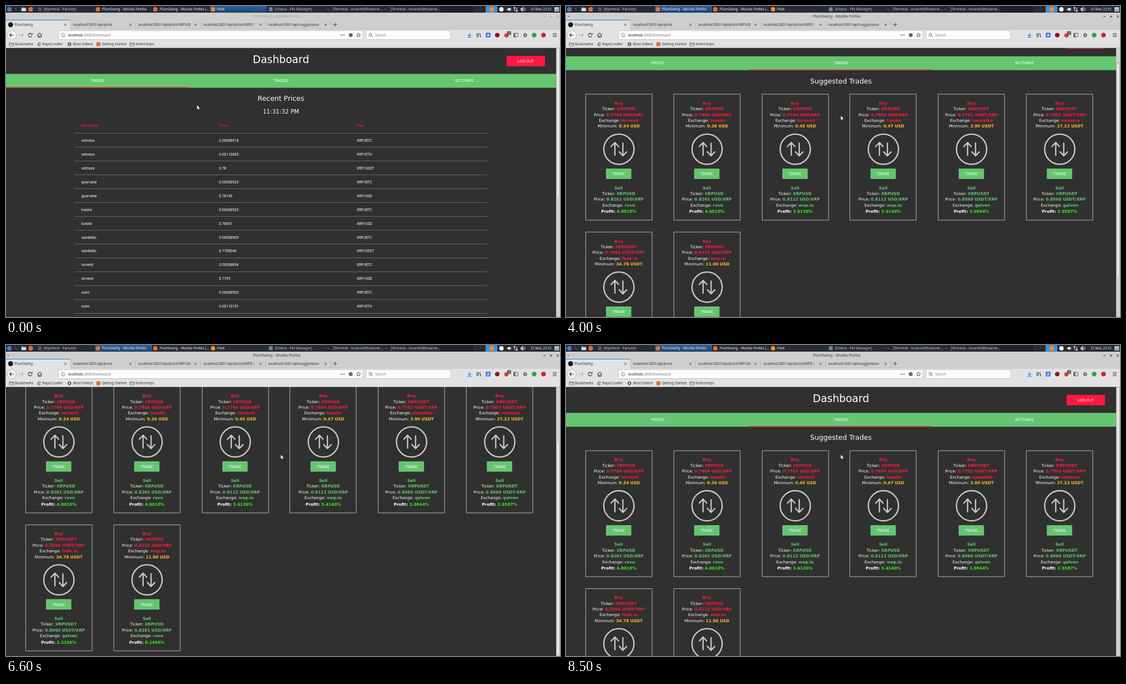
These frames come from a looping animation (998 px wide and 561 px high, 10000 ms). An HTML page with a canvas:

```html
<!DOCTYPE html>
<html lang="en">
<head>
<meta charset="utf-8">
<title>Dashboard</title>
<style>
  html, body { margin: 0; width: 100%; height: 100%; overflow: hidden; background: #303030; }
  canvas { display: block; }
</style>
</head>
<body>
<canvas id="stage" width="998" height="561"></canvas>
<script>
const ctx = document.getElementById('stage').getContext('2d');
const LOOP = 10000, STEP = 100, TOP = 75.5, PAGE_W = 991, MID = 495.3;
const UI = '"Noto Sans", sans-serif';
const ROBOTO = 'Roboto, sans-serif';
const DEJAVU = '"DejaVu Sans", sans-serif';
const RED = '#ff1744', GREEN = '#66c571', AMBER = '#ffbd2e', LIME = '#2bf312', INK = '#333';
const APP = 'PlumSwing';

const prices = [
  ['velmora', '0.00008918', 'BTC'], ['velmora', '0.00113065', 'ETH'], ['velmora', '0.78', 'USDT'],
  ['quorvane', '0.00008923', 'BTC'], ['quorvane', '0.78166', 'USD'],
  ['tundor', '0.00008923', 'BTC'], ['tundor', '0.78031', 'USD'],
  ['sandelko', '0.00008905', 'BTC'], ['sandelko', '0.7785046', 'USDT'],
  ['lorvenil', '0.00008894', 'BTC'], ['lorvenil', '0.7795', 'USD'],
  ['zulm', '0.00008905', 'BTC'], ['zulm', '0.00113151', 'ETH']
];

// currency, buy price, buy exchange, minimum, sell price, sell exchange, profit
const trades = [
  ['USD', '0.7794', 'lorvenil', '0.34', '0.8201', 'ruvo', '4.8019'],
  ['USD', '0.7804', 'tundor', '0.36', '0.8201', 'ruvo', '4.6010'],
  ['USD', '0.7794', 'lorvenil', '0.45', '0.8112', 'wop.io', '3.6126'],
  ['USD', '0.7804', 'tundor', '0.47', '0.8112', 'wop.io', '3.4140'],
  ['USDT', '0.7791', 'sandelko', '3.90', '0.8060', 'galven', '3.0944'],
  ['USDT', '0.7801', 'velmora', '27.22', '0.8060', 'galven', '2.9587'],
  ['USDT', '0.7854', 'fenk.io', '34.78', '0.8060', 'galven', '2.3156'],
  ['USD', '0.8152', 'wop.io', '11.00', '0.8201', 'ruvo', '0.1495']
];

// [time, value] points
const scrollPath = [
  [3400, 0], [3500, 20], [3600, 30], [3900, 30], [4000, 31.7], [4400, 59], [4500, 59],
  [4900, 91.3], [5300, 117], [6500, 117], [6600, 115.2], [7100, 48.1], [7400, 30],
  [7900, 30], [8200, 4], [8300, 4], [8500, 0]
];
const mouseX = [[100, 344.2], [600, 440], [1100, 495]];
const mouseY = [[100, 179], [600, 152], [1100, 136], [1600, 136], [2300, 188], [2700, 198]];

function track(points, t) {
  if (t <= points[0][0]) return points[0][1];
  for (let i = 1; i < points.length; i++) {
    const [t0, v0] = points[i - 1], [t1, v1] = points[i];
    if (t <= t1) return v0 + (v1 - v0) * (t - t0) / (t1 - t0);
  }
  return points[points.length - 1][1];
}

// cubic-bezier(0.23, 1, 0.32, 1)
function easeOut(p) {
  if (p <= 0) return 0;
  if (p >= 1) return 1;
  let lo = 0, hi = 1, u = 0.5;
  for (let i = 0; i < 20; i++) {
    u = (lo + hi) / 2;
    const x = 3 * (1 - u) ** 2 * u * 0.23 + 3 * (1 - u) * u * u * 0.32 + u ** 3;
    if (x < p) lo = u; else hi = u;
  }
  return 1 - (1 - u) ** 3;
}

function box(x, y, w, h, fill, r = 0) {
  ctx.fillStyle = fill;
  ctx.beginPath();
  ctx.roundRect(x, y, w, h, r);
  ctx.fill();
}

function frame(x, y, w, h, color, r = 0, lw = 1) {
  ctx.strokeStyle = color;
  ctx.lineWidth = lw;
  ctx.beginPath();
  ctx.roundRect(x, y, w, h, r);
  ctx.stroke();
}

function disc(x, y, r, fill) {
  ctx.fillStyle = fill;
  ctx.beginPath();
  ctx.arc(x, y, r, 0, 7);
  ctx.fill();
}

function ring(x, y, r, color, lw = 1, from = 0, to = Math.PI * 2) {
  ctx.strokeStyle = color;
  ctx.lineWidth = lw;
  ctx.beginPath();
  ctx.arc(x, y, r, from, to);
  ctx.stroke();
}

// Each path is a flat list of x, y pairs relative to (x, y).
function lines(x, y, color, lw, ...paths) {
  ctx.strokeStyle = color;
  ctx.lineWidth = lw;
  ctx.beginPath();
  for (const p of paths) {
    for (let i = 0; i < p.length; i += 2) ctx[i ? 'lineTo' : 'moveTo'](x + p[i], y + p[i + 1]);
  }
  ctx.stroke();
}

// y is the middle of the capitals
function text(str, x, y, size, font, color, align = 'left', weight = 400) {
  ctx.font = `${weight} ${size}px ${font}`;
  ctx.textAlign = align;
  ctx.fillStyle = color;
  ctx.fillText(str, x, y + size * 0.36);
}

const ui = (str, x, y, color = INK, size = 6.24) => text(str, x, y, size, UI, color);
const caps = (str, x, y) => text(str, x, y, 7.28, ROBOTO, '#fff', 'center');

// Centred pair: label and bold value
function pair(label, value, x, y, color, labelWeight = 400) {
  const size = 7.28;
  ctx.font = `${labelWeight} ${size}px ${DEJAVU}`;
  const a = ctx.measureText(label).width;
  ctx.font = `700 ${size}px ${DEJAVU}`;
  const left = x - (a + ctx.measureText(value).width) / 2;
  text(label, left, y, size, DEJAVU, '#fff', 'left', labelWeight);
  text(value, left + a, y, size, DEJAVU, color, 'left', 700);
}

function folder(x, y, color, fill) {
  if (fill) box(x - 4, y - 2.5, 8, 5.5, fill, 0.5);
  lines(x, y, color, 0.8, [-4, 3, -4, -3, -1, -3, 0, -2, 4, -2, 4, 3, -4, 3], [-4, -0.5, 4, -0.5]);
}

function gear(x, y, color) {
  ring(x, y, 2.2, color, 1.3);
  for (let i = 0; i < 8; i++) {
    const c = Math.cos(i * Math.PI / 4), s = Math.sin(i * Math.PI / 4);
    lines(x, y, color, 1, [c * 2.5, s * 2.5, c * 3.8, s * 3.8]);
  }
}

function terminal(x, y) {
  box(x - 3.5, y - 3.5, 7, 7, '#20242b', 0.8);
  lines(x, y, '#c8ccd0', 0.7, [-2, -1.8, -0.7, -0.6, -2, 0.6], [0, 1, 2, 1]);
}

function panel(focused) {
  box(0, 0, 998, 12, '#252a35');
  box(782, 0, 60, 12, '#1c2029');
  const grad = ctx.createLinearGradient(0, 0, 0, 12);
  grad.addColorStop(0, '#2f6099');
  grad.addColorStop(1, '#1d4475');
  box(focused ? 160 : 367, 0, 103, 11.5, grad);
  box(864, 0, 21, 12, '#3f8fd9');

  disc(6, 6, 4.2, '#3d7fc1');
  terminal(18, 6);
  folder(32, 6, '#b8bcc0', '#e4e4e4');
  disc(44.5, 6, 4.2, '#e8712b');
  box(57.5, 2.5, 7, 7, '#4c5574', 1);
  disc(165.5, 6, 3.9, '#e8712b');
  disc(269, 6, 3.9, '#e8712b');
  disc(373, 6, 3.9, '#f28c28');
  box(473.5, 2.2, 7, 7.6, '#66757f', 0.6);
  lines(477, 6, '#b4c0c6', 0.6, [-2, -1.5, 2, -1.5], [-2, 1, 2, 1]);
  terminal(581, 6);
  terminal(685, 6);

  const dim = '#c3c7cf', bright = '#eef0f4';
  ui('[#general - Parlune]', 68, 6, dim);
  ui(APP + ' - Mozilla Firefox', 173, 6, bright);
  ui(APP + ' - Mozilla Firefox (...', 277, 6, bright);
  ui('Peek', 380, 6, bright);
  ui('[Videos - File Manager]', 484.5, 6, dim);
  ui('[Terminal - tovarnel@tovarne...', 588.5, 6, dim);
  ui('[Terminal - tovarnel@tovarne...', 692.5, 6, dim);

  disc(875, 6, 4.4, '#f28c28');
  disc(892.5, 6, 4, '#f0f0f0');
  box(904, 3.5, 4.5, 5, '#f0f0f0', 1.5);
  lines(906, 6, '#f0f0f0', 1, [-4.5, 0, -2, 0], [2, -1.3, 4.5, -1.3], [2, 1.3, 4.5, 1.3]);
  lines(918, 6, '#f0f0f0', 1.1, [-2, 3, -2, -4], [-3.8, -1.8, -2, -4, -0.2, -1.8],
    [2, -3, 2, 4], [0.2, 1.8, 2, 4, 3.8, 1.8]);
  box(927, 4.3, 2, 3.4, '#f0f0f0');
  lines(930, 6, '#f0f0f0', 1.4, [-1, -1.5, 0.8, -3, 0.8, 3, -1, 1.5]);
  ring(931, 6, 2.3, '#f0f0f0', 0.8, -0.9, 0.9);
  ring(931, 6, 4.3, '#f0f0f0', 0.8, -0.9, 0.9);
  ui('10 Mar, 23:31', 944.5, 6, bright);
  box(988, 2, 8.5, 8, '#a9c4de', 0.5);
  lines(992, 6, '#496a8d', 0.8, [-3, 1.5, 3, 1.5]);
}

function titleBar(focused) {
  box(0, 12, 998, 63.5, '#cecece');
  const c = focused ? '#3a3a3a' : '#a4a4a4';
  text(APP + ' - Mozilla Firefox', 488, 19, 6.65, UI, c, 'center', 500);
  lines(4.5, 18.5, c, 1, [-1.5, -0.5, 0, 1, 1.5, -0.5]);
  lines(970, 19, c, 1, [-2, 0, 2, 0]);
  lines(982, 19, c, 1, [-2, 0, 2, 0], [0, -2, 0, 2]);
  lines(994, 19, c, 1, [-1.7, -1.7, 1.7, 1.7], [1.7, -1.7, -1.7, 1.7]);
}

function tabStrip() {
  box(0, 25, 116, 17.5, '#e2e2e2');
  box(0, 25, 116, 1.1, '#0a84ff');
  box(0, 42, 998, 33.5, '#e2e2e2');
  box(116, 41.6, 882, 0.6, '#b2b2b2');
  disc(8.3, 33.8, 4.5, '#161616');
  const api = 'localhost:3001/api/';
  [APP, api + 'price', api + 'price/XRPUSD', api + 'price/XRPBTC', api + 'suggestions'].forEach((name, i) => {
    const x = i * 117.2;
    ctx.save();
    ctx.beginPath();
    ctx.rect(x, 26, 98, 16);
    ctx.clip();
    ui(name, i ? x + 3.8 : 15.5, 33.8);
    ctx.restore();
    if (i === 3) {
      const fade = ctx.createLinearGradient(440, 0, 450, 0);
      fade.addColorStop(0, 'rgba(206,206,206,0)');
      fade.addColorStop(1, '#cecece');
      box(440, 28, 10, 12, fade);
    }
    lines(x + 107, 33.8, '#444', 0.9, [-2, -2, 2, 2], [2, -2, -2, 2]);
    lines(x + 116.4, 34, '#aaa', 0.6, [0, -6, 0, 6]);
  });
  lines(593, 33.5, '#444', 1, [-3.5, 0, 3.5, 0], [0, -3.5, 0, 3.5]);
}

function navBar() {
  const y = 52.5;
  disc(10.5, y, 8, '#f8f8f8');
  ring(10.5, y, 8, '#a0a0a0', 0.8);
  lines(10.5, y, INK, 1.2, [4, 0, -4, 0], [-0.8, -3.3, -4, 0, -0.8, 3.3]);
  lines(27, y, '#a8a8a8', 1.1, [-4, 0, 4, 0], [0.8, -3.3, 4, 0, 0.8, 3.3]);
  ring(43.5, y, 3.2, INK, 1.1, 0.5, 5.4);
  lines(43.5, y, INK, 1.1, [3.6, -3.8, 3.6, -0.8, 0.6, -0.8]);
  lines(60.5, y, INK, 1.1, [-4.3, 0.3, 0, -3.8, 4.3, 0.3], [-2.8, -0.5, -2.8, 3.6, 2.8, 3.6, 2.8, -0.5], [0, 3.6, 0, 1]);

  box(94.5, 44.5, 548.5, 16, '#fdfdfd', 1.2);
  frame(94.5, 44.5, 548.5, 16, '#b4b4b4', 1.2, 0.7);
  ring(102.8, y, 3.5, '#666', 0.7);
  lines(102.8, y, '#666', 0.8, [0, -2, 0, -1.2], [0, -0.5, 0, 2]);
  ui('localhost', 112, y, '#1a1a1a');
  const w = ctx.measureText('localhost').width;
  ui(':3000/Dashboard', 112 + w, y, '#7a7a7a');
  for (const dx of [-3, 0, 3]) disc(606 + dx, y, 0.9, '#555');
  disc(621, y, 3.6, '#666');
  ctx.strokeStyle = '#555';
  ctx.lineWidth = 0.9;
  ctx.beginPath();
  for (let i = 0; i < 10; i++) {
    const r = i % 2 ? 1.8 : 4.2, a = i * Math.PI / 5 - Math.PI / 2;
    ctx.lineTo(635 + r * Math.cos(a), y + r * Math.sin(a));
  }
  ctx.closePath();
  ctx.stroke();

  box(648.5, 44.5, 152.5, 16, '#fdfdfd', 1.2);
  frame(648.5, 44.5, 152.5, 16, '#b4b4b4', 1.2, 0.7);
  ring(656.5, y - 0.7, 2.5, '#555', 0.9);
  lines(656.5, y - 0.7, '#555', 1, [1.8, 1.8, 4, 4]);
  ui('Search', 665, y, '#808080');

  lines(835, y, '#0a84ff', 1.2, [0, -4, 0, 2], [-2.8, -0.6, 0, 2.2, 2.8, -0.6], [-3.8, 4, 3.8, 4]);
  lines(852, y, '#444', 1.2, [-3.5, -3.5, -3.5, 3.8], [-1.2, -3.5, -1.2, 3.8], [1, -3.5, 3.8, 3.8]);
  box(864.3, 48.3, 8.4, 8.4, '#2f7fd6', 0.6);
  text('A', 868.5, y, 6.8, ROBOTO, '#fff', 'center', 700);
  disc(885, y, 4.1, '#8d1420');
  disc(901.5, y + 0.6, 3.8, '#d93a30');
  box(902.8, 45.6, 7, 6.6, '#555', 0.7);
  text('2', 906.3, 49, 5.4, UI, '#fff', 'center');
  frame(914.5, 49.2, 8, 6.6, '#444', 0.8, 0.9);
  box(914.5, 49.2, 3, 6.6, '#666');
  gear(935.2, y, '#444');
  disc(951.5, y, 4.2, '#28a745');
  disc(968.3, y, 4.2, '#d6202b');
  lines(988.5, y, '#333', 1, [-3.5, -2.8, 3.5, -2.8], [-3.5, 0, 3.5, 0], [-3.5, 2.8, 3.5, 2.8]);
}

function bookmarks() {
  const y = 69;
  folder(10, y, '#555');
  ui('Bookmarks', 16, y);
  ring(60, y, 2.8, '#444', 1, 0.4, 5.2);
  lines(60, y, '#444', 0.9, [-4, 2.5, 0, 0, 3.5, -2.5]);
  ui('Rapid Leafer', 65.5, y);
  gear(114.3, y, '#444');
  ui('Most Visited', 120.5, y);
  disc(166.3, y, 4, '#e8712b');
  ui('Getting Started', 172.5, y);
  folder(227.3, y, '#555');
  ui('Internships', 233.5, y);
  box(0, 75, 998, 0.6, '#9c9c9c');
}

function header(inkX) {
  text('Dashboard', MID, 96.3, 18.72, DEJAVU, '#fff', 'center');
  box(901.7, 90, 69.3, 18.7, RED, 1);
  caps('LOG OUT', 936.2, 99.3);
  box(0, 122.5, PAGE_W, 25, GREEN);
  ['PRICES', 'TRADES', 'SETTINGS'].forEach((name, i) => caps(name, 165 + i * 330.3, 134.3));
  box(inkX, 146.2, 330.3, 1.3, RED);
}

function pricePage(clock) {
  text('Recent Prices', MID, 167, 12.48, DEJAVU, '#fff', 'center');
  text(clock, MID, 190.3, 10.4, DEJAVU, '#fff', 'center');
  const cols = [135.8, 383.5, 631.7];
  ['Exchange', 'Price', 'Pair'].forEach((name, i) => text(name, cols[i], 215.2, 7.28, ROBOTO, RED));
  prices.forEach(([exchange, price, base], k) => {
    const y = 242.3 + k * 24.97;
    box(123, Math.round(y - 13), 744, 1, '#666');
    [exchange, price, 'XRP/' + base].forEach((s, i) => text(s, cols[i], y, 6.7, ROBOTO, '#fff'));
  });
  box(123, 554, 744, 1, '#666');
}

function swapIcon(x, y) {
  ring(x, y, 27.2, '#cacaca', 2.4);
  ctx.lineCap = ctx.lineJoin = 'round';
  lines(x, y, '#cacaca', 2.3,
    [-7.2, 11, -7.2, -12], [-14, -4.8, -7.2, -12, -0.6, -4.8],
    [7.2, -11, 7.2, 12], [0.6, 4.8, 7.2, 12, 14, 4.8]);
  ctx.lineCap = 'butt';
  ctx.lineJoin = 'miter';
}

function card(data, i) {
  const [cur, buy, from, min, sell, to, profit] = data;
  const col = i % 6, x = 94.9 + col * 158.83;
  const unit = ` ${cur}/XRP`;
  ctx.save();
  ctx.translate(0, i < 6 ? 0 : 248.8);
  frame(Math.round(x - 60) + 0.5 - (col % 2 ? 0.2 : 0), 190.7, 119.6, 227.3, '#c4c4c4', 0, 0.9);
  pair('', 'Buy', x, 206.8, RED);
  pair('Ticker: ', 'XRP' + cur, x, 217.2, RED);
  pair('Price: ', buy + unit, x, 227.6, RED);
  pair('Exchange: ', from, x, 238, RED);
  pair('Minimum: ', `${min} ${cur}`, x, 248.4, AMBER);
  swapIcon(x + 0.4, 290);
  box(x - 22.9, 325, 45.7, 18.7, GREEN, 1);
  caps('TRADE', x, 334.4);
  pair('', 'Sell', x, 359.6, GREEN);
  pair('Ticker: ', 'XRP' + cur, x, 370, GREEN);
  pair('Price: ', sell + unit, x, 380.4, GREEN);
  pair('Exchange: ', to, x, 390.9, GREEN);
  pair('Profit: ', profit + '%', x, 402.4, LIME, 700);
  ctx.restore();
}

function tradePage() {
  text('Suggested Trades', MID, 167, 12.48, DEJAVU, '#fff', 'center');
  trades.forEach(card);
}

function scrollBar(y, h) {
  box(PAGE_W, TOP, 7, 561 - TOP, '#cfcfcf');
  box(992, y, 4.8, h, '#ececec', 2);
  frame(992, y, 4.8, h, '#a0a0a0', 2, 0.7);
}

function cursor(x, y) {
  ctx.beginPath();
  [0, 0, 0, 7.4, 1.7, 5.8, 2.9, 8.4, 4, 7.9, 2.9, 5.4, 5.1, 5.3].forEach((v, i, a) => {
    if (i % 2) ctx.lineTo(x + a[i - 1], y + v);
  });
  ctx.closePath();
  ctx.strokeStyle = '#111';
  ctx.lineWidth = 1;
  ctx.stroke();
  ctx.fillStyle = '#fff';
  ctx.fill();
}

function draw(t) {
  const focused = t >= 1000, onTrades = t >= 1300;
  const scroll = track(scrollPath, t);
  box(0, 0, 998, 561, '#303030');

  ctx.save();
  ctx.beginPath();
  ctx.rect(0, TOP, PAGE_W, 561 - TOP);
  ctx.clip();
  ctx.translate(0, -scroll);
  if (onTrades) tradePage();
  else pricePage(t < 600 ? '11:31:32 PM' : '11:31:33 PM');
  header(330.3 * easeOut((t - 1250) / 1000));
  ctx.restore();

  scrollBar(76.5 + scroll * 0.85, onTrades ? 385 : 269);
  panel(focused);
  titleBar(focused);
  tabStrip();
  navBar();
  bookmarks();
  cursor(track(mouseX, t), track(mouseY, t));
}

const start = performance.now();
function tick() {
  const t = (performance.now() - start) % LOOP;
  draw(Math.floor(t / STEP) * STEP);
  requestAnimationFrame(tick);
}
tick();
</script>
</body>
</html>
```
